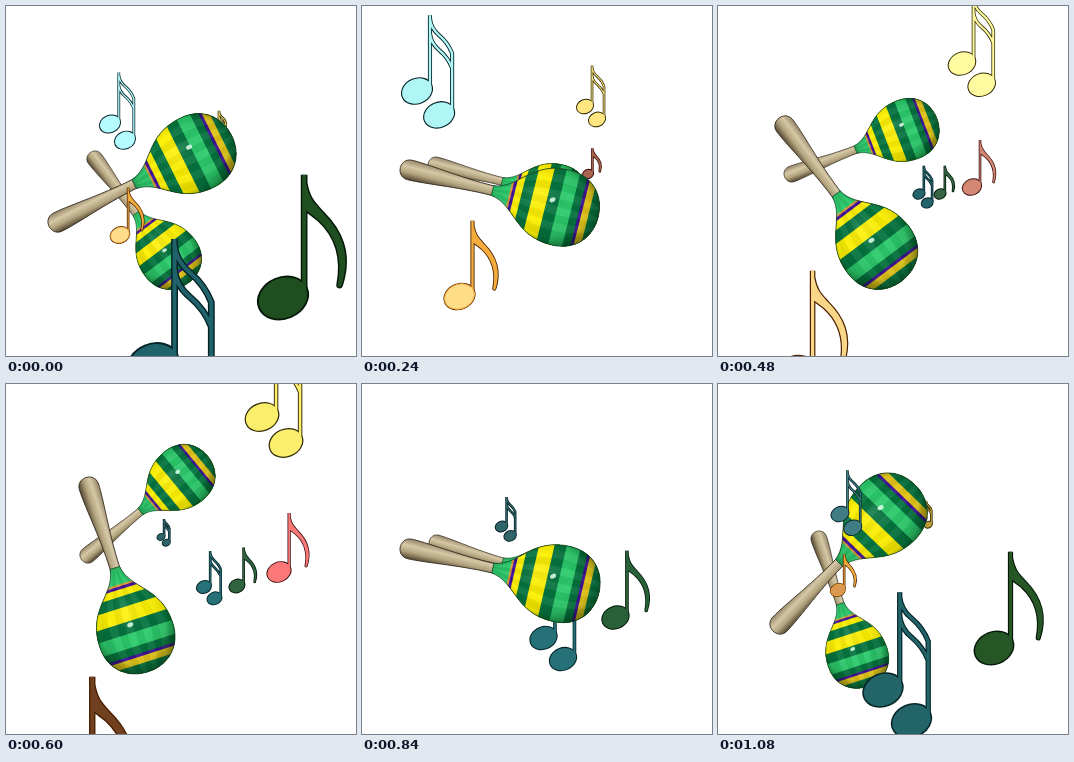
Recreate the animation shown at these times as an HTML page with a canvas. Size 350 px wide and 350 px high, loop 1200 ms.

```html
<!DOCTYPE html>
<html lang="en">
<head>
<meta charset="utf-8">
<title>Maracas</title>
<style>
  html, body { margin: 0; height: 100%; overflow: hidden; background: #fff; }
  canvas { display: block; }
</style>
</head>
<body>
<canvas id="stage" width="350" height="350"></canvas>
<script>
const ctx = document.getElementById('stage').getContext('2d');
const STEP = 120, STEPS = 10;

// Pose per step: handle end x, y and tilt in degrees.
const frontPoses = [
  [52, 216, -26.5], [47, 191, -7], [48, 164, 14], [56, 140, 33.7], [67, 120, 53],
  [83, 103, 72.3], [60, 130, 42.6], [48, 165, 13], [48, 204, -16.7], [62, 240, -46]
];
const backPoses = [
  [89, 153, 52.8], [80, 154, 34.5], [74, 159, 14], [70, 164, -3.7], [74, 168, -21],
  [82, 171, -39.6], [72, 165, -11.8], [75, 159, 16], [83, 153, 43], [101, 155, 71.9]
];

// Bands along the gourd: start position and colour.
const DARK = '#05753f', LIGHT = '#2ccb6c', YELLOW = '#fdf000', PURPLE = '#40109c', ORANGE = '#d99a38';
const bands = [
  [84, LIGHT], [102, ORANGE], [104, PURPLE], [107, YELLOW], [114, DARK], [125, YELLOW],
  [140, DARK], [152, LIGHT], [166, DARK], [174, PURPLE], [177, '#f0d018'], [184, DARK]
];

const handle = new Path2D('M0-10C20-10 55-4 92-5L92 5C55 4 20 10 0 10C-13.3 10-13.3-10 0-10Z');
const gourd = new Path2D('M85-5C110-8 116-38.5 155-38.5C180-38.5 194-21 194 0C194 21 180 38.5 155 38.5C116 38.5 110 8 85 5Z');

// Keys: step, head x, head y, head width, colour. Steps past 9 run into the next loop.
const notes = [
  { pair: true, edge: '#062428', keys: [
    [5, 155, 153, 7, '#2f6468'], [6, 148, 148, 9, '#2f6468'], [8, 131, 137, 14, '#4a8288'],
    [9, 122, 130, 17, '#3f7c84'], [10, 104, 118, 20, '#b4fcff'], [11, 83, 104, 24, '#b0f6f6'],
    [13, 27, 66, 35, '#507a7c']] },
  { pair: true, edge: '#332c06', keys: [
    [9, 205, 135, 7, '#b89a38'], [10, 209, 128, 9, '#e8d468'], [11, 214, 119, 11.5, '#ffe680'],
    [13, 232, 82, 20.5, '#fffaa0'], [15, 256, 33, 32, '#fbee6c'], [16, 258, 27, 34, '#a8a04a']] },
  { edge: '#3a0c0c', keys: [
    [12, 226, 168, 10, '#a86450'], [13, 235, 174, 13.5, '#d48874'], [15, 273, 188, 23, '#fa7878'],
    [16, 301, 200, 29, '#b64a4a']] },
  { edge: '#4c2000', core: '#f4ac3c', keys: [
    [9, 120, 206, 14, '#dc9850'], [10, 114, 229, 18.5, '#ffdc8c'], [11, 107, 257, 25, '#ffdc88'],
    [13, 88, 324, 34, '#f8d888'], [15, 66, 411, 46, '#70401f']] },
  { edge: '#041808', keys: [
    [4, 222, 188, 11, '#346444'], [5, 231, 202, 15, '#306440'], [6, 242, 217, 20, '#286038'],
    [8, 265, 250, 32, '#285828'], [9, 276, 264, 37.5, '#265526'], [10, 277, 292, 48, '#1f4f20']] },
  { pair: true, mid: true, edge: '#042428', keys: [
    [4, 201, 188, 11, '#24646a'], [5, 198, 203, 14, '#267078'], [6, 190, 227, 20, '#267078'],
    [8, 173, 281, 32, '#287078'], [9, 165, 306, 38, '#226468'], [10, 147, 359, 49, '#20626a']] }
];

// Note shapes in units of the head width, origin at the first head.
const stem = new Path2D('M.44-.1V-2.57');
const flag = new Path2D('M.44-2.4C.5-2.05 .62-1.95 .8-1.75C1.15-1.4 1.4-.95 1.18-.27C1.3-.9 1.1-1.35 .76-1.66Q.58-1.8 .44-1.9Z');
const beams = new Path2D('M1.19 .7V-1.3M.44-2.45Q.47-2.12 .76-1.88T1.19-1.28M.44-1.95Q.47-1.62 .76-1.38T1.19-.78');
const head = new Path2D();
head.ellipse(0, 0, .52, .41, -.4, 0, 7);

const single = new Path2D(stem);
single.addPath(flag);
const pair = new Path2D(stem);
pair.addPath(beams);
const pairHeads = new Path2D(head);
pairHeads.addPath(head, new DOMMatrix().translate(.75, .81));

function poseAt(keys, step) {
  const last = keys[keys.length - 1];
  if (step < keys[0][0] || step > last[0]) return null;
  const i = keys.findLastIndex(key => key[0] <= step);
  const a = keys[i], b = keys[i + 1] || a;
  const part = b === a ? 0 : (step - a[0]) / (b[0] - a[0]);
  const mix = n => a[n] + (b[n] - a[n]) * part;
  return { x: mix(1), y: mix(2), w: mix(3), color: a[4] };
}

function drawNote(note, { x, y, w, color }) {
  const lines = note.pair ? pair : single;
  const heads = note.pair ? pairHeads : head;
  const edge = Math.max(1.5, w * .06) / w;
  const width = Math.max(.14, 2.6 / w);
  const bright = note.core && w < 40;
  const lineColor = bright ? note.core : color;
  ctx.save();
  ctx.translate(x, y);
  ctx.scale(w, w);
  ctx.lineJoin = 'round';
  ctx.strokeStyle = note.edge;
  ctx.lineWidth = width;
  ctx.stroke(lines);
  ctx.lineWidth = edge * 1.3;
  ctx.stroke(heads);
  ctx.strokeStyle = ctx.fillStyle = lineColor;
  ctx.lineWidth = width - edge;
  ctx.stroke(lines);
  if (!note.pair) ctx.fill(flag);
  ctx.fillStyle = color;
  ctx.fill(heads);
  if (bright) {
    ctx.lineWidth = edge * .6;
    ctx.stroke(heads);
  }
  ctx.restore();
}

function drawMaraca([x, y, degrees], size) {
  const angle = degrees * Math.PI / 180;
  const cos = Math.cos(angle), sin = Math.sin(angle);
  ctx.save();
  ctx.translate(x, y);
  ctx.rotate(angle);
  ctx.scale(size, size);

  const wood = ctx.createLinearGradient(0, -10, 0, 10);
  wood.addColorStop(0, '#95866a');
  wood.addColorStop(.35, '#d6c8a6');
  wood.addColorStop(.65, '#b3a37f');
  wood.addColorStop(1, '#51452f');
  ctx.fillStyle = wood;
  ctx.strokeStyle = '#30291c';
  ctx.lineWidth = .8;
  ctx.fill(handle);
  ctx.stroke(handle);

  ctx.save();
  ctx.clip(gourd);
  for (const [start, color] of bands) {
    ctx.fillStyle = color;
    ctx.fillRect(start, -42, 200 - start, 84);
  }
  // Facets run lengthwise.
  for (let i = -4; i < 4; i++) {
    ctx.fillStyle = i % 2 ? 'rgba(0,0,0,.05)' : 'rgba(255,255,255,.05)';
    ctx.beginPath();
    ctx.moveTo(80, 0);
    ctx.quadraticCurveTo(140, i * 13, 194, i * 5);
    ctx.lineTo(194, i * 5 + 5);
    ctx.quadraticCurveTo(140, i * 13 + 13, 80, 0);
    ctx.fill();
  }
  // Light comes from the upper left of the stage, whatever the tilt.
  const lightX = -5 * cos - 7 * sin, lightY = 5 * sin - 7 * cos;
  ctx.save();
  ctx.translate(140, 0);
  ctx.scale(1.4, 1);
  const shade = ctx.createRadialGradient(lightX, lightY, 5, lightX / 3, lightY / 3, 45);
  shade.addColorStop(0, 'rgba(255,255,255,.08)');
  shade.addColorStop(.4, 'rgba(0,0,0,0)');
  shade.addColorStop(.75, 'rgba(0,20,0,.1)');
  shade.addColorStop(1, 'rgba(0,20,0,.5)');
  ctx.fillStyle = shade;
  ctx.fillRect(-45, -45, 90, 90);
  ctx.restore();
  ctx.fillStyle = 'rgba(225,255,235,.85)';
  ctx.beginPath();
  ctx.ellipse(152 + lightX, lightY, 3.2, 2.2, -.5 - angle, 0, 7);
  ctx.fill();
  ctx.restore();

  ctx.strokeStyle = 'rgba(0,45,20,.75)';
  ctx.stroke(gourd);
  ctx.restore();
}

function draw(step) {
  const layers = { behind: [], mid: [], front: [] };
  for (const note of notes) {
    for (const at of [step, step + STEPS]) {
      const pose = poseAt(note.keys, at);
      if (!pose) continue;
      const layer = note.mid ? 'mid' : pose.w < 13 ? 'behind' : 'front';
      layers[layer].push([note, pose]);
    }
  }
  const drawLayer = name => layers[name].forEach(item => drawNote(...item));

  ctx.fillStyle = '#fff';
  ctx.fillRect(0, 0, 350, 350);
  drawLayer('behind');
  drawMaraca(backPoses[step], .8);
  drawLayer('mid');
  drawMaraca(frontPoses[step], 1);
  drawLayer('front');
}

function tick() {
  draw(Math.floor(performance.now() / STEP) % STEPS);
  requestAnimationFrame(tick);
}
tick();
</script>
</body>
</html>
```
